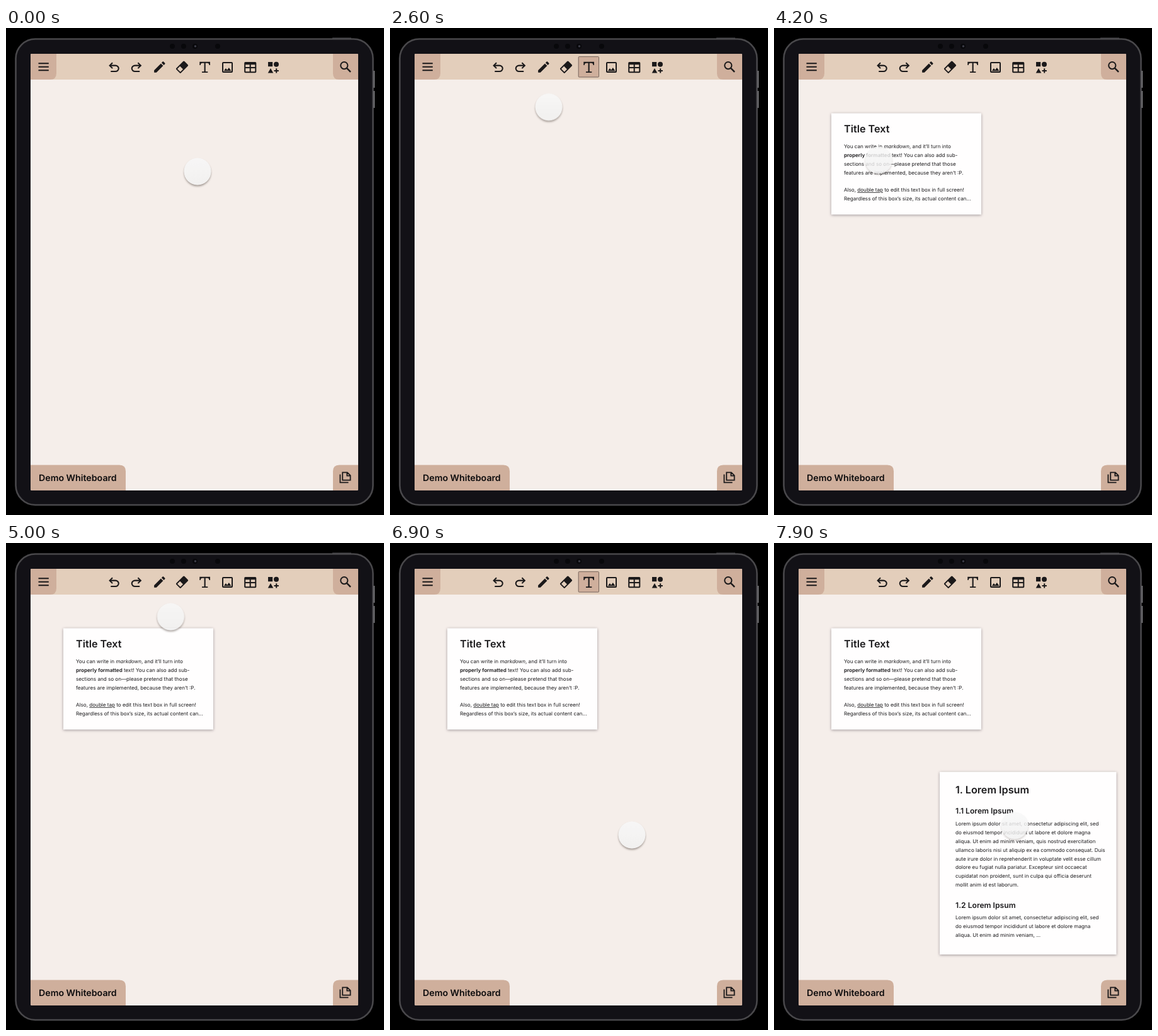
An HTML page for the animation above (8000 ms loop, 600x774 px).

```html
<!DOCTYPE html>
<html lang="en">
<head>
<meta charset="utf-8">
<title>Whiteboard demo</title>
<style>
html, body { margin: 0; width: 100%; height: 100%; overflow: hidden; background: #000; }
svg { display: block; width: 600px; height: 774px; }
text { font-family: Inter, "Open Sans", sans-serif; fill: #1b1a1c; text-rendering: geometricPrecision; white-space: pre; }
.h1 { font-size: 16.2px; font-weight: 600; }
.h2 { font-size: 12.15px; font-weight: 600; }
.body { font-size: 8.1px; }
.name { font-size: 14.2px; font-weight: 600; fill: #0d0c0d; }
.b { font-weight: 600; }
.i { font-style: italic; }
.u { text-decoration: underline; }
.tab { fill: #cfaf9c; }
.line { fill: none; stroke: #1b191a; stroke-width: 2; }
.solid { fill: #1b191a; }
.card { fill: #fffefe; filter: drop-shadow(0 1px 2px rgba(50, 40, 50, .45)); }

#active { animation: active 8s step-end infinite; }
#note1 { animation: note1 8s step-end infinite; }
#note2 { animation: note2 8s step-end infinite; }
#finger { animation: move 8s ease-in-out infinite; }
#disc { animation: press 8s linear infinite; }
#shade { animation: shade 8s linear infinite; }

@keyframes active {
  0% { opacity: 0; } 24.5% { opacity: 1; } 45% { opacity: 0; }
  67.5% { opacity: 1; } 92.5%, 100% { opacity: 0; }
}
@keyframes note1 { 0% { opacity: 0; } 45%, 100% { opacity: 1; } }
@keyframes note2 { 0% { opacity: 0; } 92.5%, 100% { opacity: 1; } }
@keyframes move {
  0%, 11% { transform: translate(304px, 228px); }
  21.5%, 27% { transform: translate(317px, 64px); }
  39%, 43.75% { transform: translate(166px, 207px); }
  46%, 57% { transform: translate(166px, 210px); }
  66.5%, 69.5% { transform: translate(316px, 64px); }
  85%, 87% { transform: translate(384px, 464px); }
  92%, 100% { transform: translate(382px, 449px); }
}
@keyframes press {
  0%, 22.5% { opacity: .86; } 24%, 25% { opacity: .7; }
  27%, 42% { opacity: .86; } 43.5%, 44.5% { opacity: .66; }
  47%, 65.5% { opacity: .82; } 67%, 68% { opacity: .7; }
  69.5%, 90.5% { opacity: .86; } 92%, 93% { opacity: .66; }
  95.5%, 100% { opacity: .82; }
}
@keyframes shade {
  0%, 22.5% { opacity: 1; } 24%, 25% { opacity: 0; }
  27%, 42% { opacity: 1; } 43.5%, 44.5% { opacity: 0; }
  47%, 56% { opacity: .5; } 58%, 65.5% { opacity: 1; } 67%, 68% { opacity: 0; }
  69.5%, 90.5% { opacity: 1; } 92%, 93% { opacity: 0; }
  95.5%, 100% { opacity: .5; }
}
</style>
</head>
<body>
<svg viewBox="0 0 600 774" xmlns="http://www.w3.org/2000/svg">
  <defs>
    <linearGradient id="face" x1="0" y1="0" x2="0" y2="1">
      <stop offset="0" stop-color="#f8f8f8"/><stop offset="1" stop-color="#f1f1f1"/>
    </linearGradient>
    <filter id="soft" x="-50%" y="-50%" width="200%" height="200%"><feGaussianBlur stdDeviation="1.4"/></filter>
    <mask id="rim">
      <rect x="-40" y="-40" width="80" height="80" fill="#fff"/><circle r="21.3" fill="#000"/>
    </mask>
    <path id="undo" d="M7 19v-2h7.1q1.575 0 2.738-1T18 13.5T16.838 11T14.1 10H7.8l2.6 2.6L9 14L4 9l5-5l1.4 1.4L7.8 8h6.3q2.425 0 4.163 1.575T20 13.5t-1.737 3.925T14.1 19z"/>
  </defs>

  <!-- Tablet -->
  <rect width="600" height="774"/>
  <path d="M518 16.2h30" stroke="#55545a" stroke-width="1.4"/>
  <path d="M584 68v27M584 100v27" stroke="#8d8c90" stroke-width="2.2"/>
  <rect x="15.5" y="17.5" width="567" height="740.5" rx="31" fill="#121116" stroke="#49484b" stroke-width="2.6"/>
  <g fill="#08080b">
    <circle cx="264" cy="29" r="4"/><circle cx="282" cy="29" r="4"/><circle cx="300" cy="29" r="4"/><circle cx="336" cy="29" r="4"/>
  </g>
  <circle cx="300.5" cy="29" r="1.8" fill="#3d3d47"/>

  <!-- Screen -->
  <rect x="39" y="41" width="520" height="694" rx="2" fill="#f5eeea"/>
  <path fill="#e3cebb" d="M39 82V43q0-2 2-2H557q2 0 2 2V82z"/>
  <path class="tab" d="M39 82V43q0-2 2-2H80V72q0 10-10 10z"/>
  <path class="tab" d="M559 82V43q0-2-2-2H519V72q0 10 10 10z"/>
  <path class="tab" d="M39 694.5H180q10 0 10 10V735H41q-2 0-2-2z"/>
  <path class="tab" d="M559 694.5H529q-10 0-10 10V735H557q2 0 2-2z"/>
  <rect id="active" x="299.2" y="45.6" width="32.3" height="32.4" rx="1" fill="#cfaf9c" stroke="#75635a"/>

  <!-- Corner icons -->
  <path class="line" d="M51.5 56.2h16.3M51.5 61.7h16.3M51.5 67.2h16.3"/>
  <g class="line">
    <circle cx="536.8" cy="59.6" r="5.6"/><path d="M540.8 63.6L547 69.8" stroke-width="2.4"/>
    <g stroke-width="1.8">
      <path d="M530.4 709.5V722.3H543.5"/>
      <path d="M534.2 706.3H541.8L546.6 711.1V718.6H534.2zM541.3 706.3V711.6H546.6"/>
    </g>
  </g>
  <text class="name" x="52" y="719.9">Demo Whiteboard</text>

  <!-- Toolbar icons -->
  <g class="solid">
    <use href="#undo" transform="translate(159 50.3) scale(1.04)"/>
    <use href="#undo" transform="translate(219.5 50.3) scale(-1.04 1.04)"/>
    <path transform="translate(232.2 50.4) scale(.97)" d="M3 17.25V21h3.75L17.81 9.94l-3.75-3.75zM20.71 7.04c.39-.39.39-1.02 0-1.41l-2.34-2.34c-.39-.39-1.02-.39-1.41 0l-1.83 1.83l3.75 3.75z"/>
    <g transform="translate(279.5 62.2) rotate(-45)">
      <rect x="-9.2" y="-5.3" width="18.4" height="10.6" rx="1.6"/>
      <rect x="-7.3" y="-3.4" width="6" height="6.8" fill="#e3cebb"/>
    </g>
    <path d="M307.3 53.8H324V59h-1.5q-.2-3.3-3-3.3h-2.8V69.3h3.6V71.1h-9.3V69.3h3.6V55.7h-2.8q-2.8 0-3 3.3h-1.5z"/>
    <path d="M345.8 68.2l3.1-4.1l2.2 2.7l2.7-3.7l3.8 5.1z"/>
    <path fill-rule="evenodd" d="M380 54H395.500q1.800 0 1.800 1.800V69.500q0 1.800-1.800 1.800H380q-1.800 0-1.800-1.800V55.800q0-1.800 1.800-1.800zM380.200 58.300V62H386.700V58.300zM388.700 58.300V62H395.300V58.300zM380.200 64V69.300H386.700V64zM388.700 64V69.300H395.300V64z"/>
    <rect x="416" y="54" width="7.2" height="7.2"/>
    <circle cx="429" cy="57.8" r="4"/>
    <path d="M420 64l4.300 7.400h-8.600z"/>
  </g>
  <g class="line">
    <rect x="344" y="55" width="15" height="15" rx="1"/>
    <path d="M425.500 67.900h7.400M429.200 64.200v7.400"/>
  </g>

  <g id="note1">
    <rect class="card" x="91" y="135.500" width="238" height="161"/>
    <text class="h1" x="111" y="166.400">Title Text</text>
    <g class="body">
      <text x="111" y="191.200">You can write in <tspan class="i">markdown</tspan>, and it’ll turn into</text>
      <text x="111" y="205"><tspan class="b">properly formatted</tspan> text! You can also add sub-</text>
      <text x="111" y="218.800">sections and so on—please pretend that those</text>
      <text x="111" y="232.600">features are implemented, because they aren’t :P.</text>
      <text x="111" y="260.200">Also, <tspan class="u">double tap</tspan> to edit this text box in full screen!</text>
      <text x="111" y="274">Regardless of this box’s size, its actual content can...</text>
    </g>
  </g>

  <g id="note2">
    <rect class="card" x="263" y="363.800" width="280.500" height="290.200"/>
    <text class="h1" x="288" y="398">1. Lorem Ipsum</text>
    <text class="h2" x="288" y="430.300">1.1 Lorem Ipsum</text>
    <g class="body">
      <text x="288" y="449.300">Lorem ipsum dolor sit amet, consectetur adipiscing elit, sed</text>
      <text x="288" y="463.100">do eiusmod tempor incididunt ut labore et dolore magna</text>
      <text x="288" y="476.900">aliqua. Ut enim ad minim veniam, quis nostrud exercitation</text>
      <text x="288" y="490.700">ullamco laboris nisi ut aliquip ex ea commodo consequat. Duis</text>
      <text x="288" y="504.500">aute irure dolor in reprehenderit in voluptate velit esse cillum</text>
      <text x="288" y="518.300">dolore eu fugiat nulla pariatur. Excepteur sint occaecat</text>
      <text x="288" y="532.100">cupidatat non proident, sunt in culpa qui officia deserunt</text>
      <text x="288" y="545.900">mollit anim id est laborum.</text>
    </g>
    <text class="h2" x="288" y="579.700">1.2 Lorem Ipsum</text>
    <g class="body">
      <text x="288" y="598.400">Lorem ipsum dolor sit amet, consectetur adipiscing elit, sed</text>
      <text x="288" y="612.200">do eiusmod tempor incididunt ut labore et dolore magna</text>
      <text x="288" y="626">aliqua. Ut enim ad minim veniam, ...</text>
    </g>
  </g>

  <!-- Touch pointer -->
  <g id="finger">
    <g id="shade"><g mask="url(#rim)"><circle cy="2.200" r="21.300" fill="#4a3c36" opacity=".48" filter="url(#soft)"/></g></g>
    <circle id="disc" r="21.500" fill="url(#face)"/>
  </g>
</svg>
</body>
</html>
```
